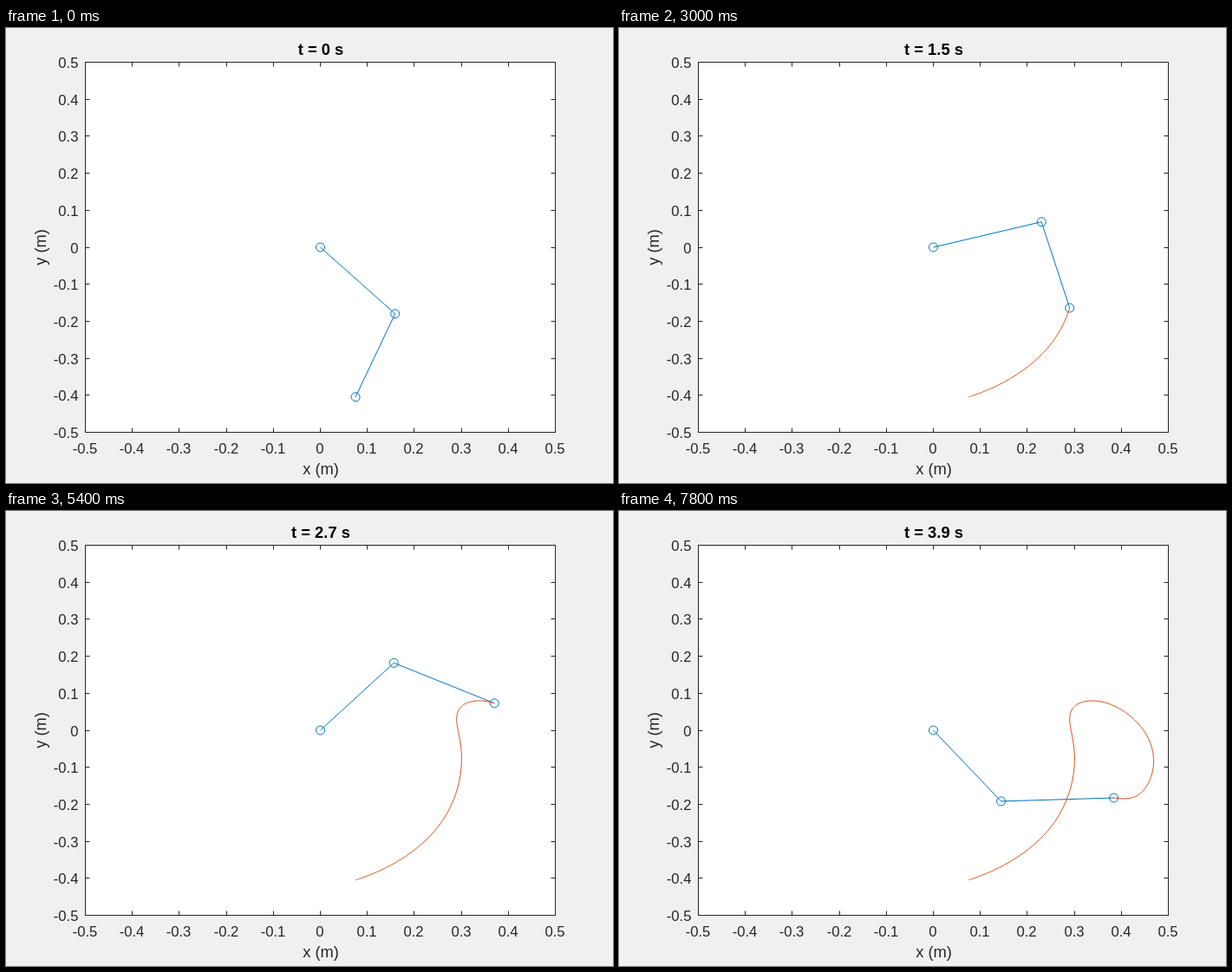
An HTML page with a canvas that plays this animation: 700x525 px, repeating every 8 s.

```html
<!DOCTYPE html>
<html lang="en">
<head>
<meta charset="utf-8">
<title>Two-link arm</title>
<style>
html, body { margin: 0; width: 100%; height: 100%; overflow: hidden; background: #f0f0f0; }
canvas { display: block; width: 700px; height: 525px; }
</style>
</head>
<body>
<canvas id="stage" width="700" height="525"></canvas>
<script>
const ctx = document.getElementById('stage').getContext('2d');
const LOOP = 8000, STEP = 200, LINK = 0.24;
const BOX = { x: 91.5, y: 39.5, w: 542, h: 427 };
const FONT = '"Liberation Sans", Arial, sans-serif';
const INK = '#262626', BLUE = '#0072bd', ORANGE = '#d95319';

// Joint angles in degrees at a few moments of simulated time.
const TIMES = [0, 0.6, 1, 1.2, 1.5, 1.8, 2, 2.7, 3, 3.2, 3.6, 3.9];
const SHOULDER = [-48.5, -43.4, -24.6, -9.7, 16.6, 42.1, 55, 49.3, 24.7, 4.6, -32.2, -53.1];
const ELBOW = [-62, -64.5, -73.4, -80.1, -92.1, -101.8, -105.2, -76.3, -46.6, -23.1, 21.6, 55.3];

// Cubic spline starting at rest, with a natural end.
function spline(ts, vs) {
  const n = ts.length - 1;
  const h = i => ts[i + 1] - ts[i];
  const d = i => (vs[i + 1] - vs[i]) / h(i);
  const m = vs.map(() => 0);
  for (let pass = 0; pass < 80; pass++) {
    for (let i = 1; i < n; i++) {
      const a = 1 / h(i - 1), b = 1 / h(i);
      m[i] = (3 * (d(i - 1) * a + d(i) * b) - m[i - 1] * a - m[i + 1] * b) / (2 * (a + b));
    }
    m[n] = (3 * d(n - 1) - m[n - 1]) / 2;
  }
  return t => {
    let i = 0;
    while (i < n - 1 && t > ts[i + 1]) i++;
    const s = (t - ts[i]) / h(i), r = 1 - s;
    return vs[i] * r * r * (1 + 2 * s) + vs[i + 1] * s * s * (3 - 2 * s)
      + h(i) * s * r * (m[i] * r - m[i + 1] * s);
  };
}

const shoulder = spline(TIMES, SHOULDER);
const elbow = spline(TIMES, ELBOW);

const toStage = (x, y) => [BOX.x + (x + 0.5) * BOX.w, BOX.y + (0.5 - y) * BOX.h];

function arm(t) {
  const a = shoulder(t) * Math.PI / 180;
  const b = a + elbow(t) * Math.PI / 180;
  const x = LINK * Math.cos(a), y = LINK * Math.sin(a);
  return [
    toStage(0, 0),
    toStage(x, y),
    toStage(x + LINK * Math.cos(b), y + LINK * Math.sin(b))
  ];
}

function polyline(points, color) {
  ctx.strokeStyle = color;
  ctx.lineWidth = 1;
  ctx.beginPath();
  points.forEach(p => ctx.lineTo(...p));
  ctx.stroke();
}

function label(text, x, y, size, align = 'center', color = INK, weight = '') {
  ctx.font = `${weight} ${size}px ${FONT}`;
  ctx.textAlign = align;
  ctx.fillStyle = color;
  ctx.fillText(text, x, y);
}

function drawAxes() {
  const { x, y, w, h } = BOX;
  ctx.fillStyle = '#fff';
  ctx.fillRect(x, y, w, h);
  ctx.strokeStyle = INK;
  ctx.lineWidth = 1;
  ctx.strokeRect(x, y, w, h);
  ctx.beginPath();
  for (let i = 0; i <= 10; i++) {
    const px = Math.floor(x + w * i / 10) + 0.5;
    const py = Math.floor(y + h * i / 10) + 0.5;
    for (const [edge, dir] of [[y, 1], [y + h, -1]]) {
      ctx.moveTo(px, edge);
      ctx.lineTo(px, edge + 5 * dir);
    }
    for (const [edge, dir] of [[x, 1], [x + w, -1]]) {
      ctx.moveTo(edge, py);
      ctx.lineTo(edge + 5 * dir, py);
    }
    label(String((i - 5) / 10), px - 0.5, 491, 16.67);
    label(String((5 - i) / 10), 83.5, py + 6.5, 16.67, 'right');
  }
  ctx.stroke();
  label('x (m)', 363, 515, 18.33);
  ctx.save();
  ctx.translate(46, 253);
  ctx.rotate(-Math.PI / 2);
  label('y (m)', 0, 0, 18.33);
  ctx.restore();
}

// Toolbar icons, each centred on its own origin.
const ICONS = {
  share: new Path2D('M-8 3V8H4M-6 3L0 -5L5 -7L3 -2L-1 3H-6M1 3H6'),
  brush: new Path2D('M2 -8H5V0H1V-7ZM-1 1H7V4H-2ZM-2 4L-7 8H7V4'),
  tips: new Path2D('M-7 -8H8V8H-7V3L-9 0L-7 -3ZM-3 -3H5M-3 2H5'),
  turn: new Path2D('M6 -6A8.3 8.3 0 1 0 8 2M8 -8V-3H3M0 -4L4 -2V3L0 5L-4 3V-2ZM-4 -2L0 0L4 -2M0 0V5'),
  hand: new Path2D('M-4 3L-8 -1Q-8 -3 -6 -2L-4 0V-6Q-3 -8 -2 -6V-1V-7Q0 -10 1 -7V-1V-6Q3 -9 4 -6V0V-4Q6 -6 7 -4V3Q6 8 2 9H-1Q-3 8 -5 3'),
  zoomIn: new Path2D('M5 -2A6.5 6.5 0 1 1 -8 -2A6.5 6.5 0 1 1 5 -2M3 3L9 9M-5 -2H2M-1.5 -5.5V1.5'),
  zoomOut: new Path2D('M5 -2A6.5 6.5 0 1 1 -8 -2A6.5 6.5 0 1 1 5 -2M3 3L9 9M-5 -2H2'),
  home: new Path2D('M-9 0L0 -8L9 0M-6 -2V8H-2V2H2V8H6V-2M5 -7V-4')
};

function drawToolbar(names, alpha) {
  ctx.save();
  ctx.globalAlpha = alpha;
  ctx.strokeStyle = ctx.fillStyle = '#777';
  ctx.lineWidth = 1.6;
  names.forEach((name, i) => {
    ctx.save();
    ctx.translate(Math.round(621.5 - 25 * (names.length - 1 - i)), 25.5);
    ctx.stroke(ICONS[name]);
    if (name === 'share') ctx.fill(new Path2D('M10 3V8H5Z'));
    if (name === 'brush') ctx.fill(new Path2D('M2 -8H5V1H1ZM-2 4H7V8H-7Z'));
    ctx.restore();
  });
  ctx.restore();
}

function draw(ms) {
  const frame = Math.floor(ms / STEP);
  const t = frame / 10;
  ctx.fillStyle = '#f0f0f0';
  ctx.fillRect(0, 0, 700, 525);
  drawAxes();
  label(`t = ${t} s`, 363, 31, 18.33, 'center', '#000', 'bold');

  const joints = arm(t);
  polyline(joints, BLUE);
  for (const [x, y] of joints) {
    ctx.beginPath();
    ctx.arc(x, y, 5, 0, 2 * Math.PI);
    ctx.stroke();
  }
  const trail = [];
  for (let i = 0; i <= frame * 5; i++) trail.push(arm(i / 50)[2]);
  if (frame) polyline(trail, ORANGE);

  const names = Object.keys(ICONS);
  if (ms >= 3400 && ms < 4600) drawToolbar(names, 1);
  else if (ms >= 5800 && ms < 6600) {
    drawToolbar(names.filter(n => n !== 'turn'), ms < 6400 ? 1 : 0.15);
  }
}

const start = performance.now();
function tick() {
  draw((performance.now() - start) % LOOP);
  requestAnimationFrame(tick);
}
tick();
</script>
</body>
</html>
```
